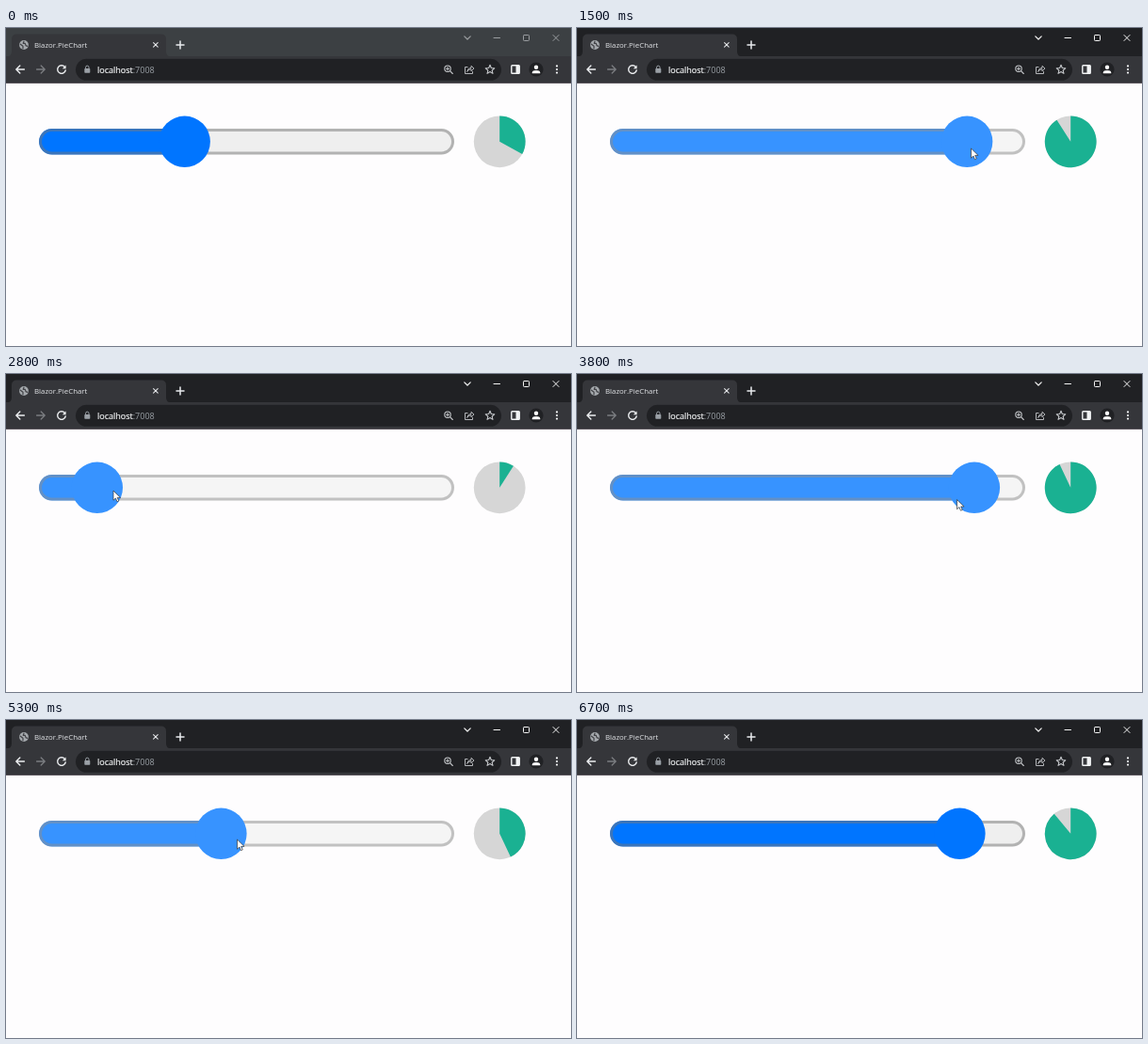
Write an HTML page that moves like this. It is 600 px wide and 338 px high and loops after 7.2 s.

```html
<!DOCTYPE html>
<html lang="en">
<head>
<meta charset="utf-8">
<title>Slider and pie chart</title>
<style>
html, body { margin: 0; width: 100%; height: 100%; overflow: hidden; background: #fefdfe; }
svg { display: block; width: 100vw; height: 100vh; }
text { font-family: "Open Sans", "Noto Sans", sans-serif; }
.line { fill: none; stroke-linecap: round; stroke-linejoin: round; }
</style>
</head>
<body>
<svg viewBox="0 0 600 338" preserveAspectRatio="none">
  <rect width="600" height="338" fill="#fefdfe"/>

  <!-- title bar and tab -->
  <rect id="bar" width="600" height="31"/>
  <path d="M0 30.5Q6 30.5 6 25V12Q6 6.5 11.500 6.500H164.500Q170 6.500 170 12V25Q170 30.500 176 30.500Z" fill="#35363a"/>
  <rect y="30" width="600" height="28.500" fill="#35363a"/>
  <rect y="58" width="600" height=".8" fill="#4a444b"/>
  <circle cx="19" cy="18" r="4.900" fill="#a5a9ad"/>
  <path d="M15.300 17.200L18 19.300V21.800M19 14.200L18.200 16.300H20.300L21 18.600L22.800 19.400" class="line" stroke="#414246" stroke-width="1.200"/>
  <text x="30" y="20.800" font-size="7.85" fill="#e3e5e8">Blazor.PieChart</text>
  <path d="M156.600 15.600L161.200 20.200M161.200 15.600L156.600 20.200" class="line" stroke="#e3e5e8" stroke-width="1.100"/>
  <path d="M181 18H189M185 14V22" class="line" stroke="#e8eaed" stroke-width="1.500"/>
  <g id="buttons" class="line" stroke-width="1">
    <path d="M486.800 8.800L490 12L493.200 8.800" stroke-width="1.200"/>
    <path d="M518 10.500H524.500"/>
    <rect x="549.500" y="7.500" width="6" height="6" rx=".8"/>
    <path d="M581 7.500L587 13.500M587 7.500L581 13.500"/>
  </g>

  <!-- toolbar -->
  <path d="M19.400 44H11M14.800 40L10.800 44L14.800 48" class="line" stroke="#eceef0" stroke-width="1.400"/>
  <path d="M32.600 44H41M37.200 40L41.200 44L37.200 48" class="line" stroke="#7b7d81" stroke-width="1.300"/>
  <path d="M62.300 41.300A4.300 4.300 0 1 0 63.200 45" class="line" stroke="#eceef0" stroke-width="1.400"/>
  <path d="M63.600 39.400V43.200H59.800Z" fill="#eceef0"/>
  <rect x="74" y="32.800" width="452" height="23" rx="11.500" fill="#202124"/>
  <rect x="83.300" y="43" width="6" height="4.800" rx=".7" fill="#9aa0a6"/>
  <path d="M84.600 43V41.800A1.700 1.700 0 0 1 88 41.800V43" class="line" stroke="#9aa0a6" stroke-width="1"/>
  <text x="97" y="47.500" font-size="9" fill="#9aa0a6"><tspan fill="#f1f3f4" stroke="#f1f3f4" stroke-width=".2">localhost</tspan>:7008</text>
  <g class="line" stroke="#c4c7ca" stroke-width="1.100">
    <circle cx="469" cy="43.200" r="3.200"/>
    <path d="M471.500 45.700L474.300 48.500M467.600 43.200H470.400M469 41.800V44.600"/>
    <path d="M490 41.500H487.500V48.500H495.500V46.500M489.800 46Q490.300 42.500 494 42.300V40.300L497 43L494 45.700V43.800Q491.500 43.800 489.800 46Z" stroke-width=".9"/>
    <path id="star"/>
  </g>
  <rect x="536.800" y="39.800" width="8.400" height="8.400" rx=".8" class="line" stroke="#f1f3f4" stroke-width="1.400"/>
  <rect x="541.500" y="39.800" width="3.700" height="8.400" fill="#f1f3f4"/>
  <circle cx="563" cy="44" r="7.600" fill="#202124"/>
  <circle cx="563" cy="41.800" r="2.200" fill="#fff"/>
  <path d="M558.700 48.300V47.400Q559 45 563 45T567.300 47.400V48.300Z" fill="#fff"/>
  <g fill="#f1f3f4">
    <circle cx="585" cy="40.400" r="1.100"/><circle cx="585" cy="44" r="1.100"/><circle cx="585" cy="47.600" r="1.100"/>
  </g>

  <!-- slider -->
  <rect id="track" x="35" y="107" width="441" height="27.500" rx="13.750"/>
  <rect id="fill" x="35" y="107" height="27.500" rx="13.750"/>
  <rect id="border" x="36.500" y="108.500" width="438" height="24.500" rx="12.250" fill="none" stroke-width="3" stroke-opacity=".5"/>
  <circle id="thumb" cy="120.800" r="27.200"/>

  <!-- pie -->
  <circle cx="524.200" cy="120.800" r="27.400" fill="#d6d6d6"/>
  <path id="slice" fill="#1ab192"/>

  <path id="cursor" d="M0 0V10.200L2.400 8L4 11.700L5.800 10.900L4.200 7.400H7.600Z" fill="#fff" stroke="#333" stroke-width=".7" stroke-linejoin="round"/>
</svg>
<script>
const LOOP = 7200, STEP = 100;
const $ = id => document.getElementById(id);
const set = (id, attrs) => {
  for (const k in attrs) $(id).setAttribute(k, attrs[k]);
};

// [time, percent]
const valueKeys = [
  [700, 33], [1500, 91], [1700, 97], [2300, 0], [2600, 0], [2800, 9], [3600, 99],
  [3800, 93], [4700, 29], [4900, 26], [5300, 43], [6000, 89]
];
// [time, x, y]
const cursorKeys = [
  [400, 196, 131], [500, 190, 128], [700, 192, 128], [1500, 418.5, 128],
  [1650, 440, 128], [2250, 40, 126], [2400, 5, 125], [2550, 30, 125],
  [2800, 114, 124], [3550, 446, 132], [3800, 403.5, 133.5], [4700, 165, 124.5],
  [4850, 158, 125], [5300, 245.5, 127], [5950, 406, 130], [6100, 418, 133],
  [6200, 438, 137], [6600, 528, 159]
];
const looks = {
  normal: { fill: '#0075ff', track: '#efefef', border: '#767676' },
  hover: { fill: '#005cc8', track: '#e5e5e5', border: '#4f4f4f' },
  pressed: { fill: '#3793ff', track: '#f5f5f5', border: '#8d8d8d' }
};

// Smooth curve through the keys that never overshoots them.
function curve(keys, t, c = 1) {
  const last = keys.length - 1;
  if (t <= keys[0][0]) return keys[0][c];
  if (t >= keys[last][0]) return keys[last][c];
  const rise = i => (keys[i + 1][c] - keys[i][c]) / (keys[i + 1][0] - keys[i][0]);
  const slope = i => {
    if (i === 0 || i === last) return 0;
    const a = rise(i - 1), b = rise(i);
    return a * b > 0 ? 2 * a * b / (a + b) : 0;
  };
  let i = 0;
  while (t >= keys[i + 1][0]) i++;
  const h = keys[i + 1][0] - keys[i][0], u = (t - keys[i][0]) / h, w = 1 - u;
  return w * w * ((1 + 2 * u) * keys[i][c] + u * h * slope(i)) +
    u * u * ((3 - 2 * u) * keys[i + 1][c] - w * h * slope(i + 1));
}

function slice(percent) {
  const a = percent / 50 * Math.PI, r = 27.4;
  const x = 524.2 + r * Math.sin(a), y = 120.8 - r * Math.cos(a);
  return `M524.2 120.8V${120.8 - r}A${r} ${r} 0 ${percent > 50 ? 1 : 0} 1 ${x} ${y}Z`;
}

function star(cx, cy, r) {
  const pts = Array.from({ length: 10 }, (_, i) => {
    const a = i * Math.PI / 5, d = i % 2 ? r * 0.45 : r;
    return `${cx + d * Math.sin(a)} ${cy - d * Math.cos(a)}`;
  });
  return `M${pts.join('L')}Z`;
}

function mode(t) {
  if (t >= 700 && t <= 6000) return 'pressed';
  return t >= 400 && t <= 6100 ? 'hover' : 'normal';
}

function draw(time) {
  const t = Math.floor(time % LOOP / STEP) * STEP;
  const active = t >= 700;
  const value = Math.round(curve(valueKeys, t));
  const x = 62 + 3.87 * value;
  const look = looks[mode(t)];
  set('bar', { fill: active ? '#202124' : '#3c4043' });
  set('buttons', { stroke: active ? '#f4f4f4' : '#9a9da0' });
  set('track', { fill: look.track });
  set('fill', { fill: look.fill, width: x - 35 });
  set('border', { stroke: look.border });
  set('thumb', { fill: look.fill, cx: x });
  set('slice', { d: slice(value) });
  set('cursor', {
    visibility: t >= 400 && t <= 6600 ? 'visible' : 'hidden',
    transform: `translate(${curve(cursorKeys, t)} ${curve(cursorKeys, t, 2)})`
  });
}

set('star', { d: star(514, 44.3, 5) });
const start = performance.now();
function tick() {
  draw(performance.now() - start);
  requestAnimationFrame(tick);
}
tick();
</script>
</body>
</html>
```
